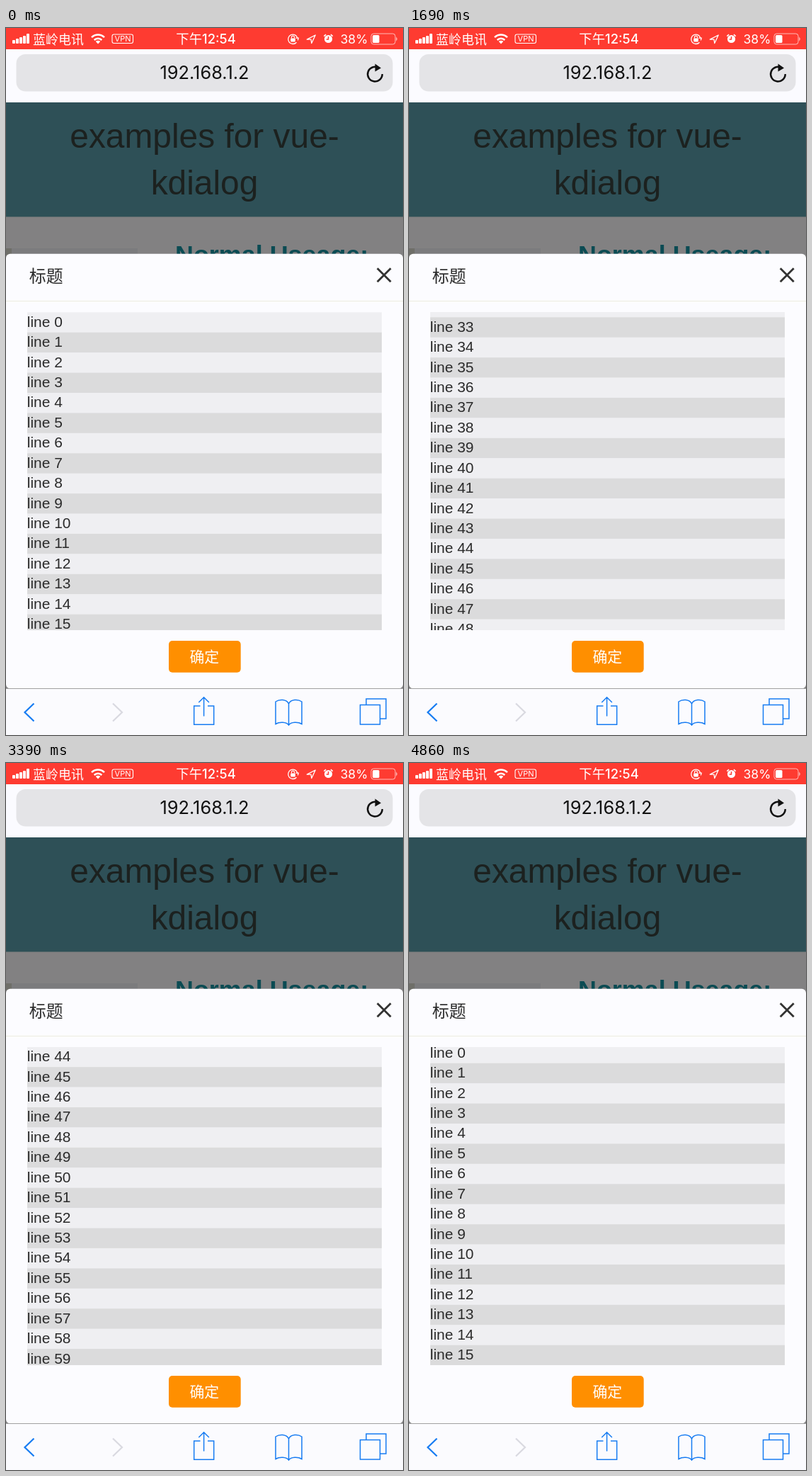
These frames come from a looping animation (561 by 998 pixels, 4.91 s). An HTML page:

```html
<!DOCTYPE html>
<html lang="zh">
<head>
<meta charset="utf-8">
<title>Dialog scroll</title>
<style>
  html, body { margin: 0; width: 100%; height: 100%; overflow: hidden; background: #fcfcff; }
  svg { display: block; width: 561px; height: 998px; }
  text { font-family: "Liberation Sans", Arial, sans-serif; }
  .ui { font-family: Inter, "Noto Sans CJK SC", "Noto Sans CJK", sans-serif; }
  .cjk { font-family: "Noto Sans CJK SC", "Noto Sans CJK", sans-serif; }
  .mid { text-anchor: middle; }
  .line { fill: none; stroke-width: 1.5; }
  .heading { font-size: 47.87px; fill: #1c211f; }
  #rows text { font-size: 20.94px; fill: #2b2b2b; }
</style>
</head>
<body>
<svg viewBox="0 0 561 998">
  <defs>
    <clipPath id="view"><rect x="30" y="401" width="501" height="449"/></clipPath>
  </defs>

  <!-- page under the overlay -->
  <rect width="561" height="998" fill="#828182"/>
  <rect y="104" width="561" height="162.5" fill="#2e5057"/>
  <text class="heading mid" x="280.5" y="169">examples for vue-</text>
  <text class="heading mid" x="280.5" y="235">kdialog</text>
  <rect y="311" width="8" height="10" fill="#6f6f69"/>
  <rect x="8" y="311" width="178" height="10" fill="#7b7b7d"/>
  <text x="239" y="331.5" font-size="35.9" font-weight="700" fill="#0b4b53">Normal Useage:</text>

  <!-- status bar -->
  <rect width="561" height="31" fill="#fe3b31"/>
  <g fill="#fff">
    <rect x="9" y="17" width="4" height="5" rx="1"/>
    <rect x="14" y="15" width="4" height="7" rx="1"/>
    <rect x="19" y="13" width="4" height="9" rx="1"/>
    <rect x="24" y="11" width="4" height="11" rx="1"/>
    <rect x="29" y="8" width="4" height="14" rx="1"/>
    <text class="cjk" x="38" y="22.6" font-size="18">蓝岭电讯</text>
    <path d="M130 22.5l-3.2-3.4a4.6 4.6 0 0 1 6.4 0z"/>
    <text class="ui mid" x="165" y="19.2" font-size="11">VPN</text>
    <text class="ui mid" x="282.5" y="22.2" font-size="18.4" font-weight="500">下午12:54</text>
    <text class="ui" x="472.5" y="22.2" font-size="17.5">38%</text>
    <rect x="518" y="10" width="9.5" height="11" rx="1.5"/>
    <path d="M551.5 12.5q2 3 0 6z"/>
    <rect x="402.2" y="14.5" width="6.6" height="5" rx="1"/>
    <circle cx="455.5" cy="15.5" r="5.6"/>
  </g>
  <g class="line" stroke="#fff">
    <path d="M124.7 17a7.6 7.6 0 0 1 10.6 0M121 13.2a12.8 12.8 0 0 1 18 0" stroke-width="2.5"/>
    <rect x="150" y="9" width="29.5" height="12.5" rx="2.5" stroke-width="1.1"/>
    <path d="M410.5 20.2A6.7 6.7 0 1 1 412 14.5M409.4 14.2h3.8l-.8 3.2" stroke-width="1.3"/>
    <path d="M403.5 14.5v-1.4a2 2 0 0 1 4 0v1.4" stroke-width="1.2"/>
    <path d="M425.3 16.2L437.2 10l-5.4 11.6-.8-5.4z" stroke-width="1.3" stroke-linejoin="round"/>
    <path d="M449.3 11.6l2.8-2.5M461.7 11.6l-2.8-2.5"/>
    <rect x="516" y="8" width="34" height="15" rx="3.5" stroke-width="1" opacity=".65"/>
  </g>
  <path class="line" d="M455.5 12V16H452.7" stroke="#fe3b31"/>

  <!-- address bar -->
  <rect y="30" width="561" height="75" fill="#fbfbff"/>
  <rect x="14.5" y="37" width="532" height="52.5" rx="13" fill="#e4e4e7"/>
  <text class="ui mid" x="280.5" y="72.3" font-size="25.4" fill="#111">192.168.1.2</text>
  <path d="M526.5 56.2A10.3 10.3 0 1 0 531.7 65" fill="none" stroke="#111" stroke-width="2.5"/>
  <path d="M521.5 50.5l8.5 6-8.5 5z" fill="#111"/>

  <!-- dialog -->
  <rect y="318.7" width="561" height="613.8" rx="6" fill="#fcfcff"/>
  <rect y="385" width="561" height="1" fill="#ececdf"/>
  <text class="cjk" x="32.8" y="359.4" font-size="23.9" fill="#2b2b2b">标题</text>
  <path d="M524.7 339.2l19 19m0-19l-19 19" fill="none" stroke="#333" stroke-width="2.8"/>
  <g clip-path="url(#view)"><g id="rows"></g></g>
  <rect x="230" y="865" width="101.7" height="44.8" rx="5" fill="#ff8f00"/>
  <text class="cjk mid" x="280.3" y="895.2" font-size="20.9" fill="#fff">确定</text>

  <!-- toolbar -->
  <rect y="932" width="561" height="1" fill="#a0a0a0"/>
  <rect y="933" width="561" height="65" fill="#fbfbfe"/>
  <g class="line" stroke="#177cf2">
    <path d="M39.5 953.5L26.5 966l13 12.5" stroke-width="2.2"/>
    <path d="M151 953.5l13 12.5-13 12.5" stroke="#d9d9e0" stroke-width="2.2"/>
    <path d="M274.5 957H265.7V983.3H293.7V957H285M279.6 971.5V944.7M272.3 952l7.3-7.3 7.3 7.3"/>
    <path d="M399.5 954c-3-6.5-13-7-18.5-3v31.5c5.5-3.5 15.5-3 18.500 1.5 3-4.5 13-5 18.500-1.5V951c-5.5-4-15.5-3.5-18.5 3v30"/>
    <rect x="500.5" y="955.5" width="28" height="27.5"/>
    <path d="M509 955V947H537V975H529"/>
  </g>
</svg>

<script>
  const LOOP = 4910, PITCH = 28.424, TOP = 401.3, ROWS = 66;
  const rows = document.getElementById('rows');

  function add(tag, attrs, label = '') {
    const el = document.createElementNS('http://www.w3.org/2000/svg', tag);
    for (const key in attrs) el.setAttribute(key, attrs[key]);
    el.textContent = label;
    rows.append(el);
  }

  for (let i = 0; i < ROWS; i++) {
    const y = TOP + i * PITCH;
    add('rect', { x: 30, y, width: 501, height: PITCH + 0.3, fill: i % 2 ? '#dbdbdc' : '#efeff2' });
    add('text', { x: 29.8, y: y + 20.5 }, 'line ' + i);
  }

  // Each swipe: first change, last change, number of steps, resting scroll offset.
  const swipes = [
    [30, 390, 7, 290.4],
    [720, 1140, 9, 619.5],
    [1450, 1730, 8, 945],
    [2030, 2230, 8, 1191],
    [2480, 2560, 4, 1313.5],
    [3360, 3530, 7, 999.5],
    [3760, 3860, 5, 667],
    [4090, 4230, 6, 330],
    [4490, 4590, 4, 90],
    [4810, 4860, 2, 6]
  ];
  const ease = x => x * x * (3 - 2 * x);

  function scrollAt(t) {
    let from = 0;
    for (const [start, end, steps, to] of swipes) {
      if (t < start) break;
      if (t < end) {
        const gap = (end - start) / (steps - 1);
        let k = 0;
        while (t >= start + Math.floor((k + 1) * gap / 10) * 10) k++;
        return from + (to - from) * ease((k + 1) / steps);
      }
      from = to;
    }
    return from;
  }

  const origin = performance.now();
  function draw(now) {
    const t = Math.max(0, now - origin) % LOOP;
    rows.setAttribute('transform', `translate(0 ${-scrollAt(t)})`);
    requestAnimationFrame(draw);
  }
  draw(origin);
</script>
</body>
</html>
```
